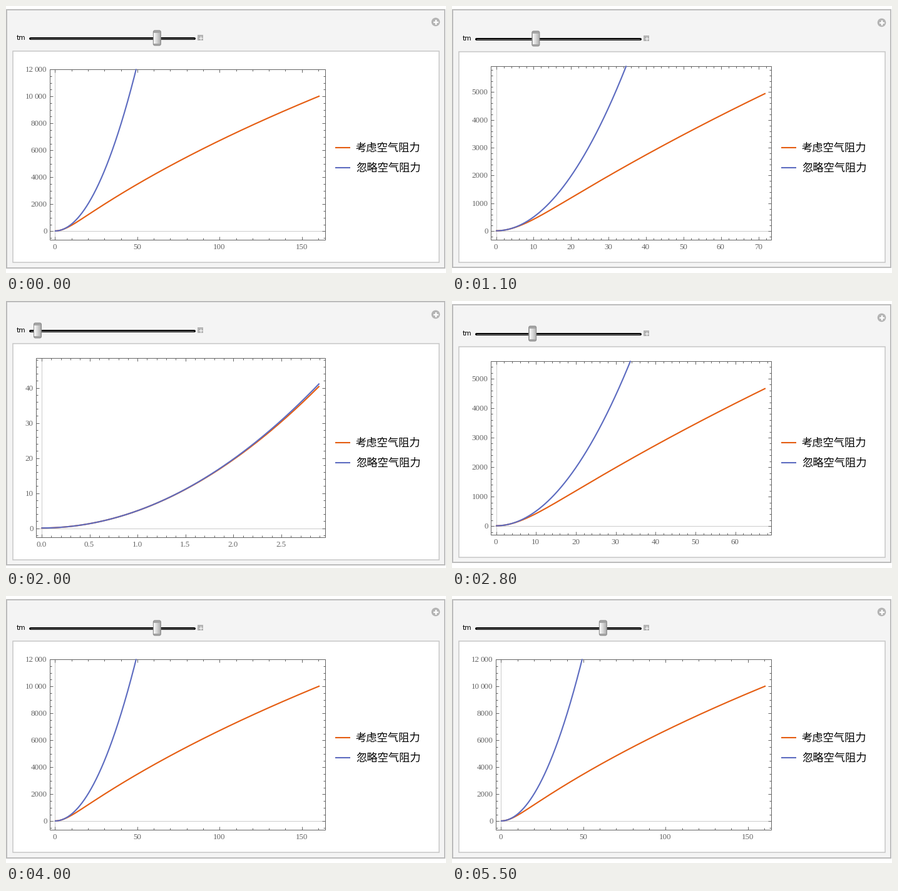
Write a matplotlib script that moves like this. It is 703x426 px and loops after 6000 ms.

```python
import math

import matplotlib.pyplot as plt
import numpy as np
from matplotlib.animation import FuncAnimation
from matplotlib.collections import LineCollection
from matplotlib.patches import Circle, FancyBboxPatch, Rectangle

W, H, DPI = 703, 426, 64
PT = 72 / DPI
FRAMES, INTERVAL = 60, 100
ORANGE, BLUE, INK = "#e55c10", "#5c6bc0", "#666666"
G, HEIGHT, V_GROUND = 9.8, 10000, 49.8
T_MIN, T_MAX, T_HOME = 1, 200, 161
GOLDEN = (1 + math.sqrt(5)) / 2


def accel(y, v):
    """Gravity less quadratic drag in a standard atmosphere."""
    density = (1 - 2.2558e-5 * (HEIGHT - y)) ** 4.256
    return G * (1 - density * (v / V_GROUND) ** 2)


def solve_fall(dt=0.05):
    ts = np.arange(0, T_MAX + 2 * dt, dt)
    ys = np.zeros_like(ts)
    y = v = 0.0
    for i in range(1, len(ts)):
        vm = v + accel(y, v) * dt / 2
        ym = y + v * dt / 2
        y, v = y + vm * dt, v + accel(ym, vm) * dt
        ys[i] = y
    return ts, ys


FALL_T, FALL_Y = solve_fall()


def drag(t):
    return np.interp(t, FALL_T, FALL_Y)


def slider_value(i):
    """Home -> min -> home, rest, home -> max -> home, rest."""
    speed = 2 * (T_MAX - T_MIN) / 5
    s = speed * 6 * i / (FRAMES - 1)
    low, high = T_HOME - T_MIN, T_MAX - T_HOME
    if s < 2 * low:
        return T_MIN + abs(low - s)
    s -= 2 * low + speed / 2
    if 0 < s < 2 * high:
        return T_MAX - abs(high - s)
    return T_HOME


def tick_step(span):
    """Smallest round step giving at most 7.5 intervals, and its subdivisions."""
    base = 10 ** math.floor(math.log10(span / 7.5))
    for m, subs in ((1, 5), (2, 4), (5, 5), (10, 5)):
        if span / (m * base) <= 7.5:
            return m * base, subs


def crisp(v):
    return math.floor(v) + 0.5


def nearest(v):
    return math.floor(v + 0.5)


fig = plt.figure(figsize=(W / DPI, H / DPI), dpi=DPI, facecolor="white")
ax = fig.add_axes([0, 0, 1, 1])


def line(xs, ys, color, width, cap="butt", z=3):
    ax.plot(xs, ys, color=color, lw=width * PT, solid_capstyle=cap,
            solid_joinstyle="round", zorder=z)


def box(x0, y0, x1, y1, face, edge="none", width=0, z=1):
    ax.add_patch(Rectangle((x0, y0), x1 - x0, y1 - y0, fc=face, ec=edge,
                           lw=width * PT, zorder=z))


def text(x, y, s, size, color=INK, font="Liberation Serif", ha="center"):
    ax.text(x, y, s, fontsize=size * PT, color=color, family=font, ha=ha,
            va="baseline", zorder=6)


def plus(x, y, r, width):
    line([x - r, x + r], [y, y], "white", width, z=6)
    line([x, x], [y - r, y + r], "white", width, z=6)


def rounded(x0, y0, w, h, r, face, edge, z):
    ax.add_patch(FancyBboxPatch((x0, y0), w, h, fc=face, ec=edge, lw=PT, zorder=z,
                                boxstyle=f"round,pad=0,rounding_size={r}"))


def draw_slider(tm, y):
    text(16.5, y + 3.3, "tm", 10.7, "black", "DejaVu Sans", "left")
    line([38.5, 300.5], [y + 0.5] * 2, "black", 4, "round")
    line([39, 300], [y + 0.5] * 2, "#8a8a8a", 1, z=4)
    x = 47 + 1.207 * tm
    rounded(x - 6, y - 12, 12, 24, 2.5, "#a4a4a4", "#8a8a8a", 5)
    for j in range(10):
        shade = 0.97 - 0.028 * j
        box(x - 5 + j, y - 8.5, x - 4 + j, y + 8.5, (shade,) * 3, z=5.5)
    box(306, y - 5, 315, y + 4, "#b4b4b4", z=5)
    plus(310.5, y - 0.5, 3, 1)


def y_label(x, y, n):
    s = f"{n:.0f}"
    text(x, y, s[-3:] if n >= 10000 else s, 13, ha="right")
    if n >= 10000:
        text(x - 21.3, y, s[:-3], 13, ha="right")


def draw_plot(tm):
    """Draws the chart and returns the inner box's top and bottom and the overhang."""
    y_end = float(drag(tm))
    y_max = 1.2 * y_end
    y_span = y_max / 0.95
    x_step, x_subs = tick_step(1.04 * tm)
    y_step, y_subs = tick_step(y_span)
    y_top = math.floor(y_max * 1.003 / y_step) * y_step

    digits = len(f"{y_top:.0f}")
    left, right = crisp(34.5 + 6.7 * digits + 1.5 * (digits > 4)), 509.5
    width = right - left
    height = width / GOLDEN
    over = max(0, 6.5 - max(0, (y_max - y_top) / y_span * height))

    inner = height + 59 + over
    i_top = nearest(240.75 - inner / 2)
    i_bottom = i_top + nearest(inner)
    bottom = i_bottom - 36.5
    top = crisp(bottom - height)

    def px(t):
        return left + (t / tm + 0.02) / 1.04 * width

    def py(v):
        return top + (y_max - v) / y_span * (bottom - top)

    line([crisp(px(0))] * 2, [top, bottom], "#cccccc", 1, z=2)
    line([left, right], [crisp(py(0))] * 2, "#cccccc", 1, z=2)

    ticks = []
    sub = x_step / x_subs
    for j in range(math.ceil(-0.02 * tm / sub), math.floor(1.02 * tm / sub) + 1):
        major = j % x_subs == 0
        x, n = crisp(px(j * sub)), 5 if major else 3
        ticks += [[(x, bottom), (x, bottom - n)], [(x, top), (x, top + n)]]
        if major:
            places = max(0, -math.floor(math.log10(x_step)))
            text(px(j * sub), bottom + 15.8, f"{j * sub:.{places}f}", 13)
    sub = y_step / y_subs
    for j in range(math.ceil((y_max - y_span) / sub), math.floor(y_max * 1.003 / sub) + 1):
        major = j % y_subs == 0
        y, n = crisp(max(py(j * sub), top)), 5 if major else 3
        ticks += [[(left, y), (left + n, y)], [(right, y), (right - n, y)]]
        if major:
            y_label(left - 4, y + 4.2, j * sub)
    ax.add_collection(LineCollection(ticks, colors=INK, linewidths=PT, zorder=4))
    box(left, top, right, bottom, "none", INK, 1, z=4)

    t = np.linspace(0, tm, 300)
    line(px(t), py(drag(t)), ORANGE, 2.1, z=5)
    t = np.linspace(0, min(tm, math.sqrt(2 * y_max / G)), 300)
    line(px(t), py(G * t * t / 2), BLUE, 2.1, z=5)
    return i_top, i_bottom, over


def update(i):
    ax.cla()
    ax.set_axis_off()
    tm = slider_value(i)
    top, bottom, over = draw_plot(tm)
    loose = 0 if over else 1

    box(1, top - 66 - loose, 701, bottom + 9 - loose, "#f4f4f4", "#bcbcbc", 2, z=0)
    box(10.5, top, 692, bottom, "white", "#c6c6c6", 1.5, z=1)
    draw_slider(tm, top - 21)
    ax.add_patch(Circle((686.5, top - 46.5), 6.8, fc="#b4b4b4", ec="none", zorder=5))
    plus(686.5, top - 46.5, 4, 2.4)

    for y, color, name in ((225.5, ORANGE, "考虑空气阻力"), (258, BLUE, "忽略空气阻力")):
        line([525.5, 549.5], [y, y], color, 2.1)
        text(559, y + 6, name, 17.3, "black", "Noto Sans CJK JP", "left")

    ax.set_xlim(0, W)
    ax.set_ylim(H, 0)
    return []


anim = FuncAnimation(fig, update, frames=FRAMES, interval=INTERVAL,
                     init_func=lambda: [], repeat=True, repeat_delay=0)
plt.show()
```
